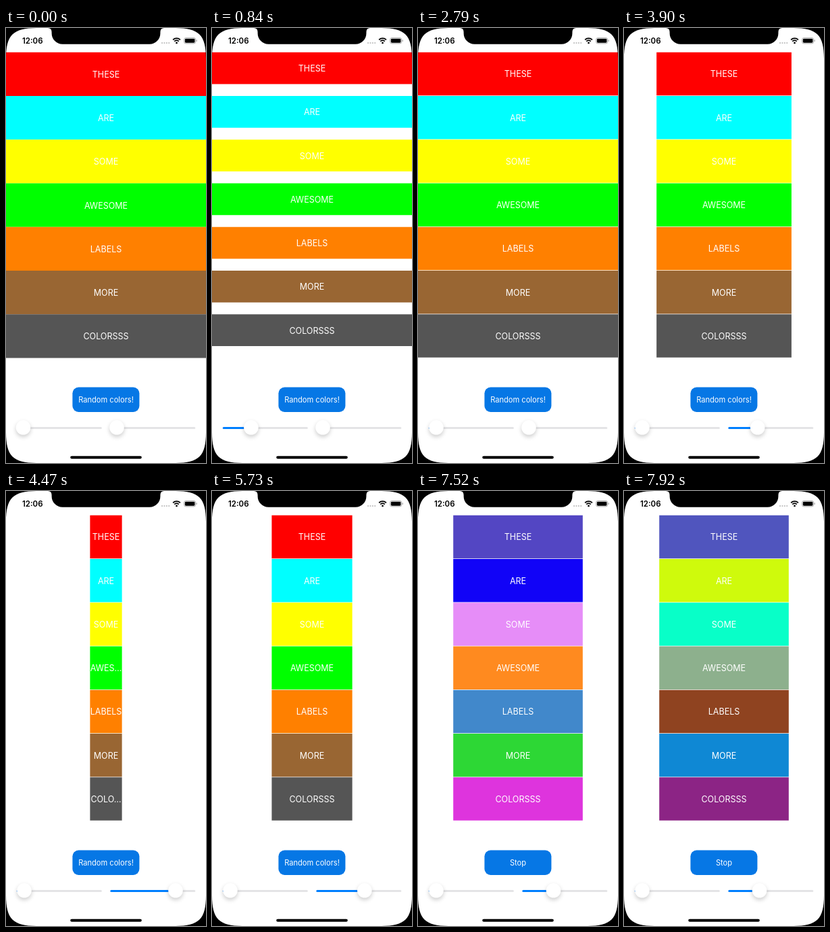
An HTML page with a canvas for the animation above (8000 ms loop, 296x640 px).

```html
<!DOCTYPE html>
<html lang="en">
<head>
<meta charset="utf-8">
<title>Spacing and colors</title>
<style>
  html, body { margin: 0; width: 100%; height: 100%; overflow: hidden; background: #fff; }
  canvas { display: block; }
</style>
</head>
<body>
<canvas id="stage" width="296" height="640"></canvas>
<script>
const ctx = document.getElementById('stage').getContext('2d');
const WIDTH = 296, HEIGHT = 640, LOOP = 8000;
const TOP = 35.75, PITCH = 64.25, TRACK = 126;
const PRESS = 6940, RELEASE = 7100, STOP = 7920, COLOR_INTERVAL = 117;
const FONT = 'Inter, Roboto, sans-serif';
const BLUE = '#007fff';

const ROWS = [
  { word: 'THESE', from: '#f00', to: '#5055be' },
  { word: 'ARE', from: '#0ff', to: '#cffa0c' },
  { word: 'SOME', from: '#ff0', to: '#08ffc8' },
  { word: 'AWESOME', from: '#0f0', to: '#8db08d' },
  { word: 'LABELS', from: '#ff8000', to: '#8f4320' },
  { word: 'MORE', from: '#963', to: '#0f88d4' },
  { word: 'COLORSSS', from: '#555', to: '#8c2485' }
];

// Thumb travel as eased drags
const gapSlider = {
  left: 15.8, rest: 25.5,
  drags: [{ start: 480, end: 1330, to: 109 }, { start: 1370, end: 2450, to: 27 }]
};
const widthSlider = {
  left: 154.3, rest: 164,
  drags: [{ start: 3620, end: 4300, to: 254.7 }, { start: 4300, end: 4820, to: 240 },
    { start: 5480, end: 6100, to: 200.5 }]
};

function smooth(t, start, end) {
  const u = Math.min(1, Math.max(0, (t - start) / (end - start)));
  return u * u * (3 - 2 * u);
}

function thumbX({ rest, drags }, t) {
  return drags.reduce((x, { start, end, to }) => x + (to - x) * smooth(t, start, end), rest);
}

function randomColor(step, row) {
  const channel = c => {
    const n = Math.sin(step * 97.3 + row * 13.7 + c * 41.9) * 43758.5;
    return Math.floor((n - Math.floor(n)) * 256);
  };
  return `rgb(${[0, 1, 2].map(channel)})`;
}

function rowColor(t, row) {
  if (t < RELEASE) return ROWS[row].from;
  if (t >= STOP) return ROWS[row].to;
  return randomColor(Math.floor((t - RELEASE) / COLOR_INTERVAL), row);
}

function box(x, y, w, h, color, radius = 0) {
  ctx.fillStyle = color;
  ctx.beginPath();
  ctx.roundRect(x, y, w, h, radius);
  ctx.fill();
}

function disc(x, y, radius, color) {
  ctx.fillStyle = color;
  ctx.beginPath();
  ctx.arc(x, y, radius, 0, Math.PI * 2);
  ctx.fill();
}

function text(string, x, baseline, size, color, weight = 400) {
  ctx.font = `${weight} ${size}px ${FONT}`;
  ctx.textAlign = 'center';
  ctx.fillStyle = color;
  ctx.fillText(string, x, baseline);
}

function truncate(word, room) {
  ctx.font = `400 12.5px ${FONT}`;
  let shown = word;
  for (let n = word.length - 1; n > 0 && ctx.measureText(shown).width > room; n--) {
    shown = word.slice(0, n) + '…';
  }
  return shown;
}

function drawRows(t, gap, width) {
  const height = PITCH - gap;
  ROWS.forEach(({ word }, row) => {
    const y = TOP + row * PITCH;
    box((WIDTH - width) / 2, y, width, height, rowColor(t, row));
    text(truncate(word, width + 1), WIDTH / 2, y + height / 2 + 4.9, 12.5, '#fff');
  });
}

function drawSlider({ left }, x) {
  box(left, 586.9, TRACK, 3.1, '#e4e4e6', 1.5);
  box(left, 586.9, x - left, 3.1, BLUE, 1.5);
  ctx.save();
  ctx.shadowColor = 'rgba(0, 0, 0, .2)';
  ctx.shadowBlur = 6;
  ctx.shadowOffsetY = 3;
  disc(x, 587.8, 10.8, '#fff');
  ctx.restore();
}

function drawButton(t) {
  const pressed = t >= PRESS && t < RELEASE;
  box(98.4, 528.6, 99, 36.4, '#0677e5', 9);
  text(t < RELEASE ? 'Random colors!' : 'Stop', WIDTH / 2, 550.9, 11.1,
    pressed ? 'rgba(255, 255, 255, .22)' : '#fff');
}

function drawStatusBar() {
  text('12:06', 39.2, 23.2, 11.5, '#000', 600);
  for (let i = 0; i < 4; i++) disc(231 + i * 3.4, 22, 1.1, '#bbb');

  ctx.lineWidth = 1.8;
  ctx.strokeStyle = '#000';
  for (const radius of [7.6, 4.6]) {
    ctx.beginPath();
    ctx.arc(252.5, 22.8, radius, -Math.PI * .75, -Math.PI * .25);
    ctx.stroke();
  }
  disc(252.5, 21.9, 1.4, '#000');

  ctx.lineWidth = .8;
  ctx.strokeStyle = '#999';
  ctx.beginPath();
  ctx.roundRect(263.6, 14.5, 17, 8.4, 2.5);
  ctx.stroke();
  box(264.8, 15.7, 14.6, 6, '#000', 1.4);
  box(281.6, 17.3, 1, 2.8, '#999', .5);
}

function drawBezel() {
  const corner = new Path2D('M0 0H45C10.5 0 0 10.5 0 45Z');
  const notch = new Path2D(
    'M62 0H234Q228.4 0 228.4 6V7.7A16 16 0 0 1 212.4 23.7H83.6A16 16 0 0 1 67.6 7.7V6Q67.6 0 62 0Z');
  ctx.fillStyle = '#000';
  ctx.fill(notch);
  for (const sx of [1, -1]) {
    for (const sy of [1, -1]) {
      ctx.setTransform(sx, 0, 0, sy, sx < 0 ? WIDTH : 0, sy < 0 ? HEIGHT : 0);
      ctx.fill(corner);
    }
  }
  ctx.resetTransform();
  box(95.2, 629.8, 105.6, 4, '#000', 2);
}

function draw(now) {
  const t = now % LOOP;
  const gapX = thumbX(gapSlider, t), widthX = thumbX(widthSlider, t);
  box(0, 0, WIDTH, HEIGHT, '#fff');
  drawRows(t, (gapX - gapSlider.rest) * .54, WIDTH - (widthX - widthSlider.rest) * 2.86);
  drawSlider(gapSlider, gapX);
  drawSlider(widthSlider, widthX);
  drawButton(t);
  drawStatusBar();
  drawBezel();
}

function tick() {
  draw(performance.now());
  requestAnimationFrame(tick);
}
tick();
</script>
</body>
</html>
```
